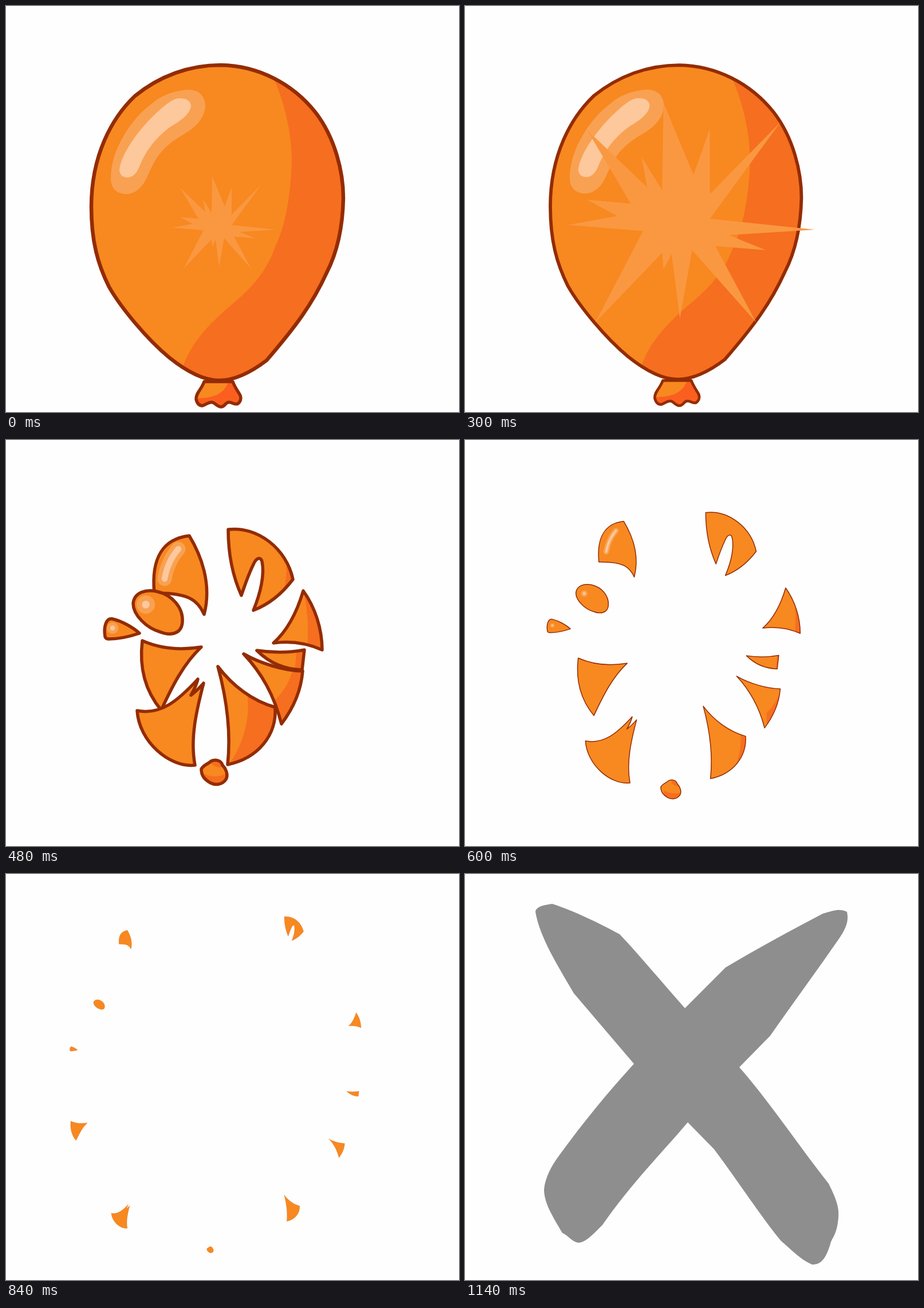
An HTML page with a canvas that plays this animation: 791 by 708 pixels, repeating every 1200 ms.

```html
<!DOCTYPE html>
<html lang="en">
<head>
<meta charset="utf-8">
<title>Balloon pop</title>
<style>
  html, body { margin: 0; width: 100%; height: 100%; overflow: hidden; background: #fefefe; }
  canvas { display: block; }
</style>
</head>
<body>
<canvas id="stage" width="791" height="708"></canvas>
<script>
const ctx = document.getElementById('stage').getContext('2d');
const ORANGE = '#f88820', SHADE = '#f66e1f', KNOT_SHADE = '#fb5f20', LINE = '#932c04';
const GLOW = '#f9a152', SHINE = '#fcc89c', STAR = '#fa9841';
const LOOP = 1200, STEP = 60, POP = 480;

const path = d => new Path2D(d);
const lerp = (a, b, p) => a + (b - a) * p;

const balloon = path('M375 103C440 104 500 135 540 185C575 230 589 290 589 335C588 385 578 430 560 465C535 520 505 560 455 618C430 637 400 653 372 653C345 653 315 637 285 613C245 580 200 525 180 490C160 450 149 410 149 350C149 260 185 195 225 157C268 122 320 103 375 103Z');
const balloonShade = path('M466 123C490 175 499 230 499 270C497 340 485 390 470 420C455 465 425 495 395 520C350 558 322 590 308 632L330 670L600 670L600 100Z');
const glow = path('M183 300C183 250 220 195 255 170C275 152 305 146 320 146C340 147 348 160 348 175C345 205 320 218 300 230C270 250 262 265 250 290C240 315 228 328 208 328C190 326 183 315 183 300Z');
const shine = path('M198 285C202 255 235 212 262 187C280 170 293 161 302 161C315 160 323 166 323 174C322 190 300 203 285 212C262 230 245 250 233 280C227 294 220 299 211 299C203 298 198 294 198 285Z');
const knot = path('M346 655C342 668 331 675 332 686C334 694 338 697 343 697C350 695 352 691 359 691C365 691 368 699 376 699C383 698 383 691 389 691C396 691 397 695 404 694C410 690 411 684 409 679C404 670 399 664 396 655Z');
const knotShade = path('M390 650C384 675 365 684 333 684L340 702L415 702L415 650Z');
const star = path('M360 297L382 350L394 316L394 364L446 311L394 382L471 390L408 394L435 405L398 402L428 458L381 405L372 455L366 408L360 419L359 407L310 458L345 391L290 386.500L326 380L304 368L336 371L304 317L348 359L344 337L359 361Z');
const cross = path('M123 66C124 56 140 54 152 52C190 64 235 86 270 105C305 142 345 190 384 234L455 163C510 130 570 98 625 69C645 63 655 60 667 66C670 80 667 92 655 110C615 168 575 222 533 282L479 337C530 395 580 470 635 540C650 570 655 585 651 608C648 630 640 636 638 645C632 664 625 682 606 681C585 672 570 655 552 640C515 595 480 540 435 480L389 433C345 485 290 540 240 612C222 630 210 643 197 643C185 640 180 630 170 626C155 600 138 575 138 550C140 530 150 510 165 490C205 435 250 380 295 331L190 208C165 165 130 110 123 66Z');

// keys: [x, y, scale] at the pop, 120 ms later and 240 ms later
const shards = [
  { d: 'M388 156C440 150 490 190 501 243C482 268 458 287 432 297C444 268 452 235 447 212C445 203 437 205 432 217C424 233 418 250 411 271C397 240 388 200 388 156Z',
    keys: [[444, 226, 1], [464, 181, .78], [487, 137, .65]], shade: 'M489 200Q492 230 484 275H520V200Z', slide: 18 },
  { d: 'M320 167C340 200 360 250 346 304C335 280 320 266 259 267C253 205 275 172 320 167Z',
    keys: [[303, 235, 1], [265, 190, .71], [227, 154, .48]], light: 'M277 242Q282 212 301 190', width: 25 },
  { d: 'M222 285C224 265 245 260 263 264C290 270 310 292 308 318C306 340 285 341 270 335C245 328 222 305 222 285Z',
    keys: [[265, 301, 1], [222, 277, .66], [187, 254, .44]], light: 'M244 287h.1', width: 32 },
  { d: 'M173 343C170 325 175 310 186 312C203 316 222 327 233 337C215 343 195 347 180 347Q174 347 173 343Z',
    keys: [[203, 329, 1], [164, 324, .67], [148, 322, .43]], light: 'M186 328h.1', width: 20 },
  { d: 'M238 350C270 364 305 367 341 361C310 390 290 430 271 471C245 440 232 400 238 350Z',
    keys: [[289, 410, 1], [240, 430, .83], [156, 448, .6]] },
  { d: 'M229 472C270 480 300 455 335 417C333 427 328 436 323 445C331 439 338 432 345 424C333 470 321 520 330 567C285 572 232 525 229 472Z',
    keys: [[287, 493, 1], [255, 541, .77], [220, 580, .59]] },
  { d: 'M370 395C395 428 430 455 470 466C473 515 440 555 387 566C393 510 385 450 370 395Z',
    keys: [[420, 480, 1], [453, 527, .74], [484, 567, .57]], shade: 'M419 430C430 480 415 535 384 572H490V430Z', slide: 36 },
  { d: 'M341 574C345 566 352 566 358 560C366 556 376 559 378 567C383 572 389 583 384 592C377 602 365 602 357 598C347 592 341 586 341 574Z',
    keys: [[363, 579, 1], [359, 609, .78], [358, 631, .54]], shade: 'M340 580Q368 594 390 578V610H340ZM358 564Q368 574 382 569V550H358Z', slide: 8 },
  { d: 'M519 263C540 292 552 330 552 366C525 354 497 350 467 354C492 332 508 300 519 263Z',
    keys: [[510, 315, 1], [553, 298, .77], [581, 278, .53]], shade: 'M517 255Q532 310 525 370H560V255Z', slide: 14 },
  { d: 'M438 367C465 371 495 371 521 366L517 401C485 400 458 387 438 367Z',
    keys: [[480, 383, 1], [520, 387, .68], [578, 391, .53]], shade: 'M508 360L504 405H530V360Z', slide: 9 },
  { d: 'M415 373C445 390 485 402 518 403C515 440 500 470 481 495C468 445 447 407 415 373Z',
    keys: [[466, 434, 1], [512, 457, .74], [553, 475, .57]], shade: 'M502 395Q495 430 468 455V500H530V395Z', slide: 18 }
];
for (const s of shards) {
  s.body = path(s.d);
  if (s.shade) s.shade = path(s.shade);
  if (s.light) s.light = path(s.light);
  const [x, y] = s.keys[2];
  s.keys.push([x + (x - 370) * .2, y + (y - 450) * .2, .12]);
}

function fill(shape, color) {
  ctx.fillStyle = color;
  ctx.fill(shape);
}

function stroke(shape, color, width) {
  if (width <= 0) return;
  ctx.strokeStyle = color;
  ctx.lineWidth = width;
  ctx.stroke(shape);
}

function clipped(shape, draw) {
  ctx.save();
  ctx.clip(shape);
  draw();
  ctx.restore();
}

function scaleAround(x, y, s) {
  ctx.translate(x, y);
  ctx.scale(s, s);
  ctx.translate(-x, -y);
}

function drawBalloon(t) {
  const p = t / 300, width = 6.5 - p * .7;
  ctx.save();
  scaleAround(147, 110, 1 - .0035 * p);
  fill(knot, ORANGE);
  clipped(knot, () => fill(knotShade, KNOT_SHADE));
  stroke(knot, LINE, width - 1);
  fill(balloon, ORANGE);
  clipped(balloon, () => fill(balloonShade, SHADE));
  stroke(balloon, LINE, width);
  fill(glow, GLOW);
  fill(shine, SHINE);
  ctx.restore();

  ctx.save();
  scaleAround(369.7, 390, t <= 300 ? lerp(1, 2.38, p) : lerp(2.38, 4.05, (t - 300) / 120));
  fill(star, STAR);
  ctx.restore();
}

function drawShard(shard, age) {
  const i = Math.min(2, Math.floor(age));
  const p = i < 2 ? age - i : (age - 2) / 1.5;
  const mix = (a, b) => lerp(a, b, p);
  const [x, y, s] = shard.keys[i].map((v, k) => mix(v, shard.keys[i + 1][k]));
  const lines = [5.5, 1.5, .5, 0];
  const [px, py] = shard.keys[0];

  ctx.save();
  ctx.translate(x, y);
  ctx.scale(s, s);
  ctx.translate(-px, -py);
  fill(shard.body, ORANGE);
  if (shard.shade && age < 2) clipped(shard.body, () => {
    ctx.globalAlpha = Math.min(1, 2 - age);
    ctx.translate(shard.slide * age, shard.slide * age / 4);
    fill(shard.shade, SHADE);
  });
  if (shard.light && age < 2) {
    const width = shard.width * (1 - age * .45);
    stroke(shard.light, GLOW, width);
    stroke(shard.light, SHINE, width * .42);
  }
  stroke(shard.body, LINE, mix(lines[i], lines[i + 1]) / s);
  ctx.restore();
}

function draw(now) {
  const t = Math.floor(now % LOOP / STEP) * STEP;
  ctx.fillStyle = '#fefefe';
  ctx.fillRect(0, 0, 791, 708);
  ctx.lineJoin = ctx.lineCap = 'round';
  if (t < POP) drawBalloon(t);
  else if (t < 960) shards.forEach(s => drawShard(s, (t - POP) / 120));
  else if (t >= 1140) fill(cross, '#8e8e8e');
}

let start;
function tick(now) {
  start ??= now;
  draw(now - start);
  requestAnimationFrame(tick);
}
draw(0);
requestAnimationFrame(tick);
</script>
</body>
</html>
```
